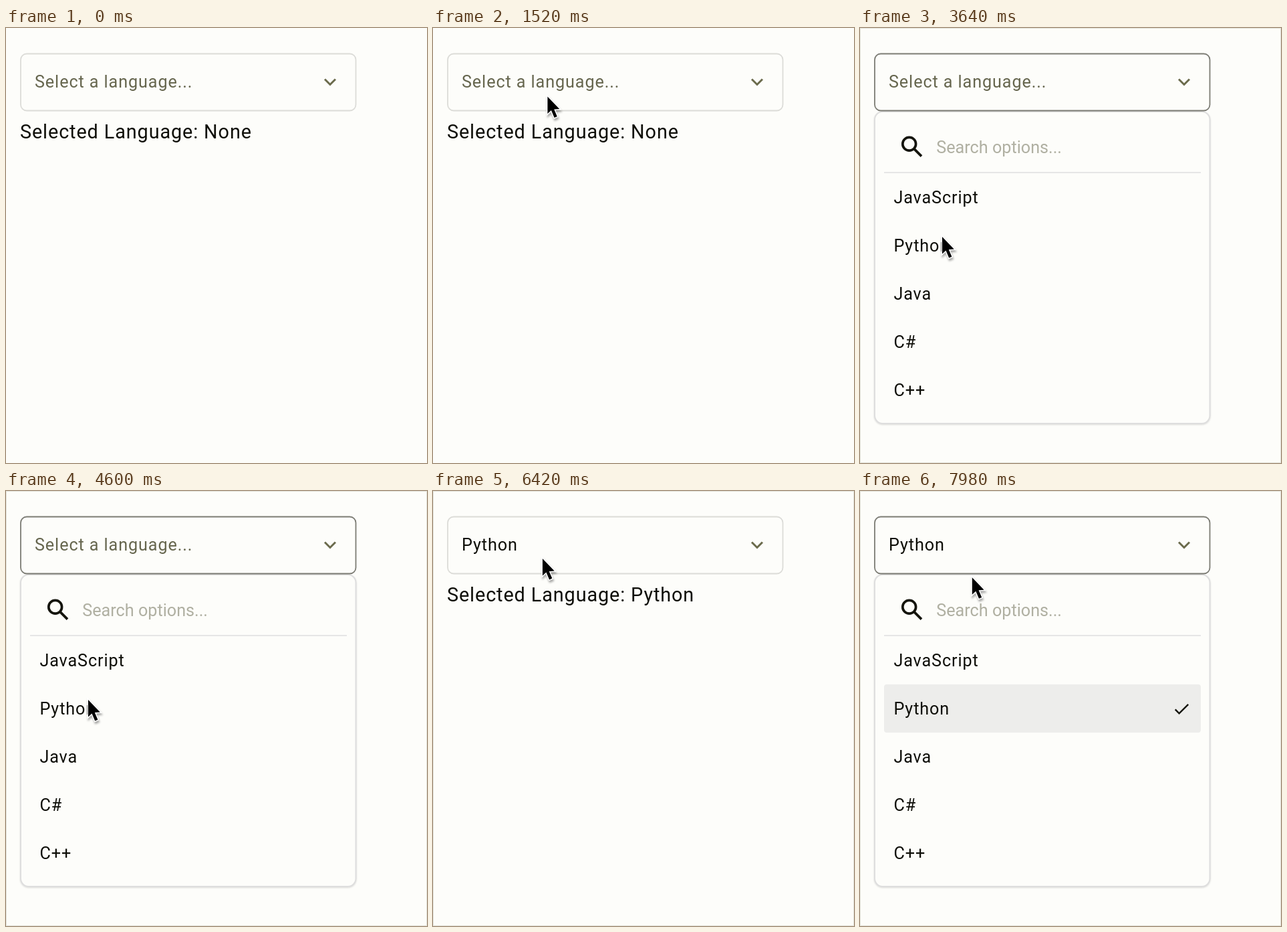
Recreate the animation shown at these times as an HTML page. Size 630x650 px, loop 8000 ms.

```html
<!DOCTYPE html>
<html lang="en">
<head>
<meta charset="utf-8">
<title>Language select</title>
<style>
  html, body { margin: 0; width: 100%; height: 100%; overflow: hidden; background: #fdfdfa; }
  svg { display: block; width: 630px; height: 650px; }
  text { font: 25.2px Roboto, sans-serif; letter-spacing: .9px; fill: #0e0e08; white-space: pre; }
  .big { font-size: 28.8px; }
  .hint { fill: #66664e; }
  .search { letter-spacing: 0; fill: #b0b0a2; }
  .field { fill: none; stroke: #dcdcd8; stroke-width: 1.8; }
  .open .field { stroke: #7c7c74; }
  .panel { fill: #fdfdfa; stroke: #dedede; stroke-width: 2; filter: drop-shadow(0 1px 1px #0002); }
  .icon { fill: none; stroke: #14140c; }
  #cursor { filter: drop-shadow(1px 3px 1.5px #0005); }
</style>
</head>
<body>
<svg id="stage" viewBox="0 0 630 650">
  <rect id="edge" x=".5" y=".5" width="629" height="649" fill="none" stroke="#e4e4da"/>

  <text id="result" class="big" x="20.9" y="165"></text>

  <g id="menu">
    <rect class="panel" x="22" y="125" width="501.5" height="466" rx="12"/>
    <g class="icon" stroke-width="3.7">
      <circle cx="73.7" cy="173.3" r="9.9"/>
      <path d="M80.5 180.1L92 191.6"/>
    </g>
    <text class="search" x="114.3" y="186.5">Search options...</text>
    <path d="M36 216H510" stroke="#dfdfdf" stroke-width="1.6"/>
    <g id="chosen">
      <rect x="36" y="289" width="474" height="72" rx="4" fill="#ededeb"/>
      <path class="icon" stroke-width="2.4" d="M471.7 326.4L477.6 332.3L491.2 318.8"/>
    </g>
    <g id="options"></g>
  </g>

  <rect class="field" x="22" y="38.5" width="501.5" height="85" rx="9"/>
  <text id="value" x="43" y="89"></text>
  <path fill="none" stroke="#6b6b4c" stroke-width="3" d="M477 76.5L485 84.5L493 76.5"/>

  <path id="cursor" d="M0 0V25.5L5.5 20.5L10.2 31.5L14.4 29.7L9.8 19L17.8 18.5Z"
    stroke="#fff" stroke-width="3" paint-order="stroke"/>
</svg>
<script>
  const LOOP = 8000, OPEN = 2360, PICK = 5000, REOPEN = 7600;
  const $ = id => document.getElementById(id);

  const easeOut = u => Math.sin(u * Math.PI / 2);
  const easeInOut = u => (1 - Math.cos(u * Math.PI)) / 2;

  const from = { x: -55, y: 520 };
  const moves = [
    { at: 0, ms: 1880, x: 182, y: 83, ease: easeOut },
    { at: 2400, ms: 1000, x: 123, y: 312, ease: easeInOut },
    { at: 5740, ms: 820, x: 167, y: 85, ease: easeInOut },
    { at: 7680, ms: 1000, x: 171, y: 300, ease: easeInOut }
  ];

  ["JavaScript", "Python", "Java", "C#", "C++"].forEach((name, i) => {
    const t = document.createElementNS("http://www.w3.org/2000/svg", "text");
    t.setAttribute("x", 50.4);
    t.setAttribute("y", 262 + i * 72);
    t.textContent = name;
    $("options").append(t);
  });

  function pointerAt(t) {
    let { x, y } = from;
    for (const m of moves) {
      const k = m.ease(Math.min(1, Math.max(0, (t - m.at) / m.ms)));
      x += (m.x - x) * k;
      y += (m.y - y) * k;
    }
    return [x, y];
  }

  const show = (id, on) => { $(id).style.display = on ? "" : "none"; };

  function draw(now) {
    const t = now % LOOP;
    const picked = t >= PICK;
    const open = (t >= OPEN && !picked) || t >= REOPEN;

    show("menu", open);
    show("result", !open);
    show("chosen", picked);
    show("edge", t >= OPEN);
    $("stage").classList.toggle("open", open);
    $("value").textContent = picked ? "Python" : "Select a language...";
    $("value").classList.toggle("hint", !picked);
    $("result").textContent = "Selected Language: " + (picked ? "Python" : "None");

    const [x, y] = pointerAt(t);
    $("cursor").setAttribute("transform", `translate(${x.toFixed(1)} ${y.toFixed(1)})`);
  }

  let start;
  function tick(now) {
    start ??= now;
    draw(Math.max(0, now - start));
    requestAnimationFrame(tick);
  }
  draw(0);
  requestAnimationFrame(tick);
</script>
</body>
</html>
```
